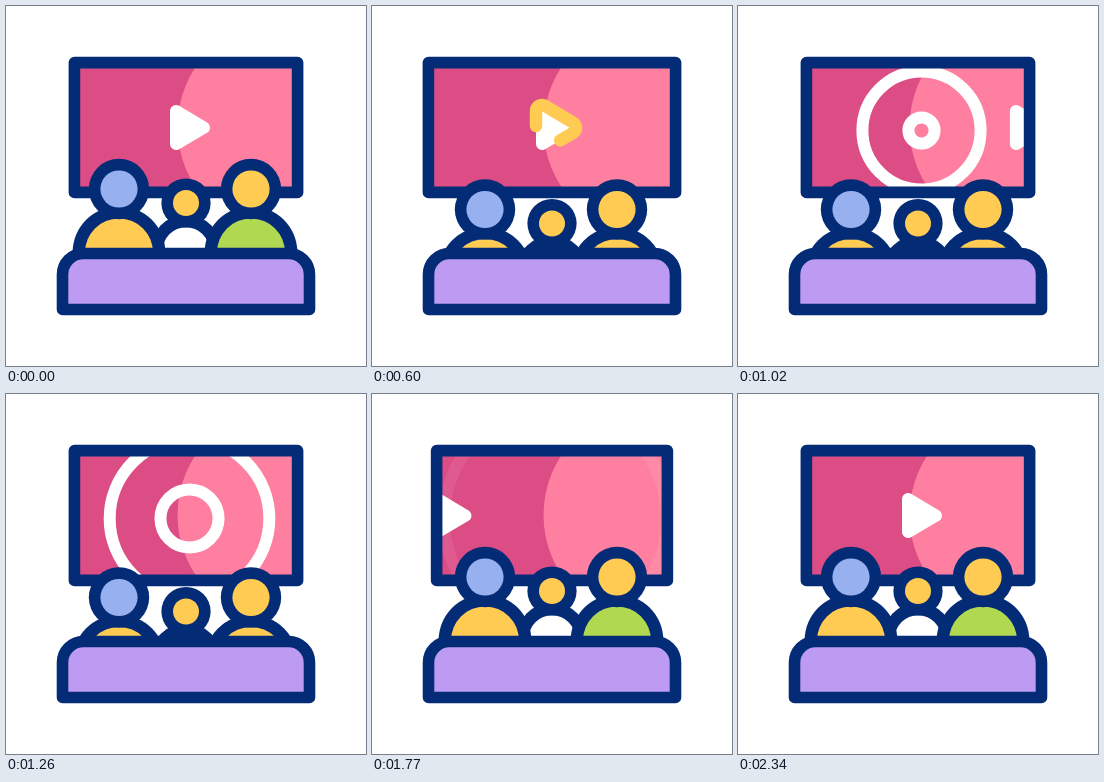
Animation, 360 px wide and 360 px high, one loop 2.37 s. Source, as an HTML page with a canvas:

```html
<!DOCTYPE html>
<html lang="en">
<head>
<meta charset="utf-8">
<style>
  html, body { margin: 0; width: 100%; height: 100%; overflow: hidden; background: #fff; }
  canvas { display: block; width: 360px; height: 360px; }
</style>
</head>
<body>
<canvas id="stage" width="360" height="360"></canvas>
<script>
const ctx = document.getElementById("stage").getContext("2d");
const LOOP = 2370;
const LINE = 11.6;
const NAVY = "#042c76", PINK = "#dc4c85", ROSE = "#ff7fa0", YELLOW = "#ffcb52";
const BLUE = "#96b0f0", GREEN = "#b0d850", LILAC = "#bd9bf3", WHITE = "#fff";
const PLAY_LENGTH = 136;

// Progress from 0 to 1 between two times, linear and eased.
const ramp = (t, from, to) => Math.min(1, Math.max(0, (t - from) / (to - from)));
const ease = (t, from, to) => {
  const u = ramp(t, from, to);
  return u * u * (3 - 2 * u);
};
const swell = (t, from, peak, to) => ease(t, from, peak) - ease(t, peak, to);

function disc(x, y, r, color) {
  ctx.fillStyle = color;
  ctx.beginPath();
  ctx.arc(x, y, r, 0, Math.PI * 2);
  ctx.fill();
}

function outlined(color) {
  ctx.fillStyle = color;
  ctx.fill();
  ctx.strokeStyle = NAVY;
  ctx.lineWidth = LINE;
  ctx.lineJoin = "round";
  ctx.stroke();
}

// A ripple whose area grows at a constant rate.
function ripple(age, growth, alpha) {
  if (age <= 0 || alpha <= 0) return;
  const r = Math.sqrt(growth * age);
  ctx.globalAlpha = alpha;
  ctx.strokeStyle = WHITE;
  ctx.lineWidth = Math.min(12, r * 2);
  ctx.beginPath();
  ctx.arc(183.5, 124.5, r, 0, Math.PI * 2);
  ctx.stroke();
  ctx.globalAlpha = 1;
}

function drawPlay(t) {
  const x = t < 1400 ? 145 * ease(t, 760, 1150) : 140 * (ease(t, 1600, 2120) - 1);
  const head = PLAY_LENGTH * ease(t, 300, 800);
  const tail = PLAY_LENGTH * ease(t, 580, 920);
  const turn = 59.2 * Math.PI / 180;
  ctx.save();
  ctx.translate(x, 0);
  ctx.beginPath();
  ctx.moveTo(164, 121.5);
  ctx.arc(170, 105, 6, Math.PI, 2 * Math.PI - turn);
  ctx.arc(198, 121.7, 6, -turn, turn);
  ctx.arc(170, 138, 6, turn, Math.PI);
  ctx.closePath();
  ctx.fillStyle = WHITE;
  ctx.fill();
  if (head - tail > 0.1) {
    ctx.strokeStyle = YELLOW;
    ctx.lineWidth = 12.5;
    ctx.lineCap = "round";
    ctx.setLineDash([head - tail, 300]);
    ctx.lineDashOffset = -tail;
    ctx.stroke();
  }
  ctx.restore();
}

function drawScreen(t) {
  const half = 111.6 + 12 * swell(t, 200, 600, 1000) + 4 * swell(t, 1300, 1850, LOOP);
  const frame = new Path2D();
  frame.rect(180 - half, 56.6, half * 2, 129.8);
  ctx.save();
  ctx.clip(frame);
  ctx.fillStyle = PINK;
  ctx.fill(frame);
  disc(280.5, 121, 109, ROSE);
  ctx.fillRect(280, 50, 40, 150);
  ripple(t - 730, 12, 1 - ramp(t, 1450, 1800));
  ripple(t - 960, 2.8, 1 - ramp(t, 1290, 1510));
  drawPlay(t);
  ctx.restore();
  ctx.strokeStyle = NAVY;
  ctx.lineWidth = LINE;
  ctx.lineJoin = "round";
  ctx.stroke(frame);
}

function person(x, headY, headR, bodyY, bodyR, skin, shirt) {
  disc(x, bodyY, bodyR + LINE + 0.8, NAVY);
  disc(x, bodyY, bodyR, shirt);
  disc(x, headY, headR + LINE, NAVY);
  disc(x, headY, headR, skin);
}

function drawPeople(t) {
  const drop = 20.5 * (ease(t, 150, 550) - ease(t, 1300, 1750));
  ctx.save();
  ctx.beginPath();
  ctx.rect(0, 0, 360, 250);
  ctx.clip();
  ctx.translate(0, drop);
  person(180, 197, 13, 244.5, 23.2, YELLOW, WHITE);
  person(113, 183, 18.6, 246.5, 34, BLUE, YELLOW);
  person(245, 183, 18.6, 246.5, 34, YELLOW, drop > 14 ? YELLOW : GREEN);
  ctx.restore();
}

function drawSofa() {
  ctx.beginPath();
  ctx.roundRect(56.5, 247.5, 247, 56, [21, 21, 0, 0]);
  outlined(LILAC);
}

function draw(t) {
  ctx.fillStyle = WHITE;
  ctx.fillRect(0, 0, 360, 360);
  drawScreen(t);
  drawPeople(t);
  drawSofa();
}

const start = performance.now();
function tick() {
  draw((performance.now() - start) % LOOP);
  requestAnimationFrame(tick);
}
tick();
</script>
</body>
</html>
```
